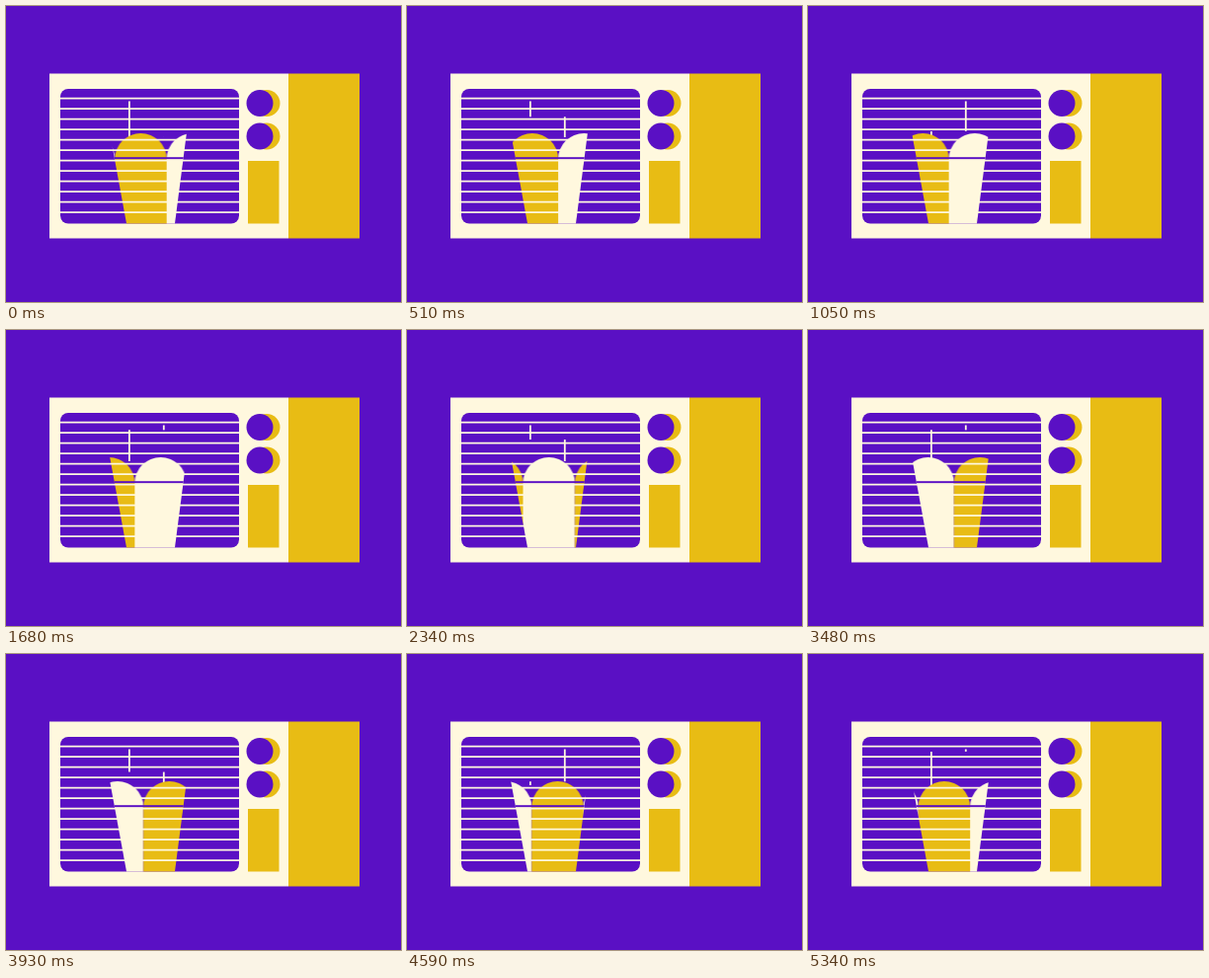
Write an HTML page that moves like this. It is 400 px wide and 300 px high and loops after 5400 ms.

```html
<!DOCTYPE html>
<html lang="en">
<head>
<meta charset="utf-8">
<title>Microwave</title>
<style>
  :root { --purple: #5a10c4; --cream: #fff8de; --yellow: #e8bc14; }
  html, body { margin: 0; width: 100%; height: 100%; overflow: hidden; background: var(--purple); }
  svg { display: block; width: 100vw; height: 100vh; }
  .purple { fill: var(--purple); }
  .cream { fill: var(--cream); }
  .yellow { fill: var(--yellow); }
  .line { fill: none; stroke: var(--cream); stroke-width: 1.8; }

  .panels { animation: turn 5.4s linear infinite; }
  @keyframes turn { to { transform: translateX(-105px); } }

  /* Each steam line grows upward, then vanishes from its foot. */
  .steam { stroke-dasharray: 1 2; animation: rise 1.8s linear infinite; }
  .early { animation-delay: -0.9s; }
  @keyframes rise { from { stroke-dashoffset: 1; } to { stroke-dashoffset: -1; } }
</style>
</head>
<body>
<svg viewBox="0 0 400 300">
  <defs>
    <path id="panel" d="M0 221V155a26.25 26 0 0 1 52.5 0V221z"/>
    <clipPath id="cup"><path d="M105 128H183L171 220.5H122z"/></clipPath>
    <g id="knob">
      <circle class="yellow" cx="264" r="13.5"/>
      <circle class="purple" cx="257" r="13.5"/>
    </g>
  </defs>

  <rect class="cream" x="44" y="68.5" width="242" height="167"/>
  <rect class="yellow" x="286" y="68.5" width="72" height="167"/>
  <rect class="purple" x="55" y="84" width="181" height="136.5" rx="8"/>
  <use href="#knob" y="98.5"/>
  <use href="#knob" y="132"/>
  <rect class="yellow" x="245" y="157" width="31.5" height="63.5"/>

  <path class="line steam early" pathLength="1" d="M124.9 133V96.5"/>
  <path class="line steam" pathLength="1" d="M159.8 133V96.5"/>

  <g clip-path="url(#cup)">
    <g class="panels">
      <use href="#panel" class="cream" x="58"/>
      <use href="#panel" class="yellow" x="110.5"/>
      <use href="#panel" class="cream" x="163"/>
      <use href="#panel" class="yellow" x="215.5"/>
      <use href="#panel" class="cream" x="268"/>
    </g>
    <rect class="purple" x="100" y="153.2" width="90" height="2"/>
  </g>

  <path id="blinds" class="line"/>
</svg>
<script>
  const rows = Array.from({ length: 12 }, (_, i) => `M55 ${93.6 + i * 10.5}H236`);
  document.getElementById('blinds').setAttribute('d', rows.join(''));
</script>
</body>
</html>
```
